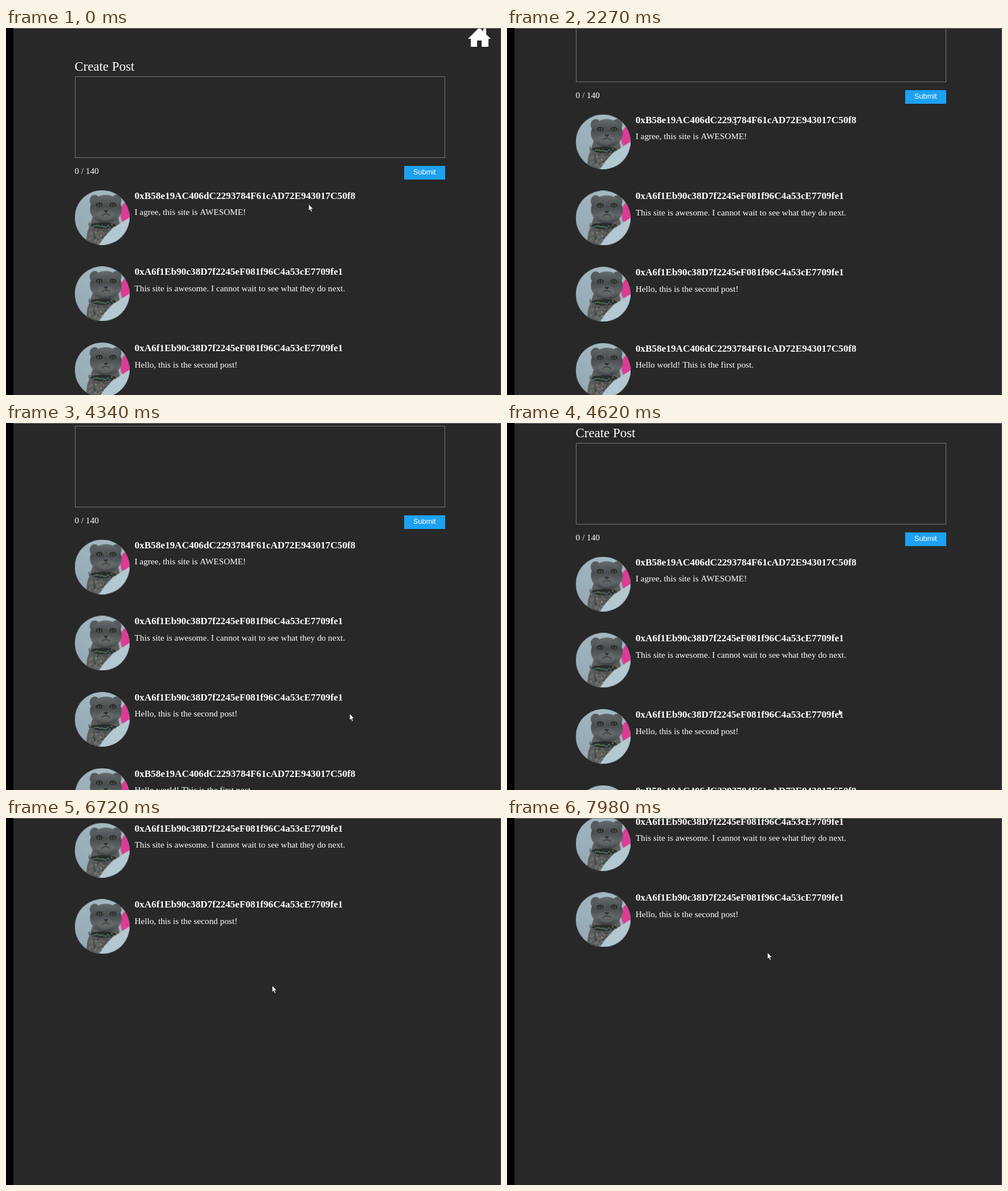
Write an HTML page with a canvas that moves like this. It is 869x644 px and loops after 8000 ms.

```html
<!DOCTYPE html>
<html lang="en">
<head>
<meta charset="utf-8">
<title>Message board</title>
<style>
  html, body { margin: 0; width: 100%; height: 100%; overflow: hidden; background: #282828; }
  canvas { display: block; }
</style>
</head>
<body>
<canvas id="stage" width="869" height="644"></canvas>
<script>
const ctx = document.getElementById('stage').getContext('2d', { alpha: false });
const LOOP = 8000, STEP = 140, PROFILE_AT = 6100;
const POST_GAP = 133.7, FEED_TOP = 284.6, PROFILE_TOP = 54;
const SERIF = '"Liberation Serif", "Times New Roman", serif';
const SANS = '"Liberation Sans", Arial, sans-serif';
const NAME_FONT = `bold 17.19px ${SERIF}`;
const TEXT_FONT = `15.28px ${SERIF}`;

const ANN = '0xB58e19AC406dC2293784F61cAD72E943017C50f8';
const BEN = '0xA6f1Eb90c38D7f2245eF081f96C4a53cE7709fe1';
const feed = [
  [ANN, 'I agree, this site is AWESOME!'],
  [BEN, 'This site is awesome. I cannot wait to see what they do next.'],
  [BEN, 'Hello, this is the second post!'],
  [ANN, 'Hello world! This is the first post.']
];
const profile = feed.filter(post => post[0] === BEN);

// Wheel scrolls: start, duration, distance
const glides = [[1800, 540, 133.7], [4230, 380, -83.7], [6715, 155, -50], [7660, 320, 57.3]];

// Pointer moves: start, duration, destination
const moves = [
  [0, 0, 531, 309],
  [100, 600, 355, 112], [700, 700, 401, 164],
  [2760, 340, 348, 380], [3100, 140, 480, 568], [3240, 120, 624, 518],
  [4060, 560, 582, 502], [4620, 420, 433, 518], [5180, 340, 405, 449],
  [5940, 780, 467, 294], [7140, 160, 459, 256], [7660, 320, 457, 236]
];

const progress = (t, start, span) => Math.max(0, Math.min(1, (t - start) / (span || 1)));
const easeOut = u => 1 - (1 - u) ** 3;
const easeBoth = u => u * u * (3 - 2 * u);

const scrollAt = t => glides.reduce(
  (sum, [start, span, by]) => sum + by * easeOut(progress(t, start, span)), 0);

function pointerAt(t) {
  let [, , x, y] = moves[0];
  for (const [start, span, toX, toY] of moves) {
    const k = easeBoth(progress(t, start, span));
    x += (toX - x) * k;
    y += (toY - y) * k;
  }
  return [Math.round(x), Math.round(y)];
}

function rect(color, x, y, w, h, c = ctx) {
  c.fillStyle = color;
  c.fillRect(x, y, w, h);
}

function text(str, x, y, font) {
  ctx.font = font;
  ctx.fillStyle = '#fff';
  ctx.fillText(str, x, Math.round(y));
}

function poly(c, color, ...points) {
  c.fillStyle = color;
  c.beginPath();
  for (let i = 0; i < points.length; i += 2) c.lineTo(points[i], points[i + 1]);
  c.closePath();
  c.fill();
}

function oval(c, color, x, y, rx, ry = rx) {
  c.fillStyle = color;
  c.beginPath();
  c.ellipse(x, y, rx, ry, 0, 0, Math.PI * 2);
  c.fill();
}

function seeded(seed) {
  return () => (seed = seed * 16807 % 2147483647) / 2147483647;
}

function makeAvatar() {
  const canvas = document.createElement('canvas');
  canvas.width = canvas.height = 96;
  const c = canvas.getContext('2d');
  const random = seeded(7);
  c.arc(48, 48, 48, 0, Math.PI * 2);
  c.clip();

  const wall = c.createLinearGradient(0, 96, 60, 0);
  wall.addColorStop(0, '#93a6b3');
  wall.addColorStop(1, '#a5bac3');
  rect(wall, 0, 0, 96, 96, c);
  oval(c, '#dc3c94', 93, 41, 13, 21);

  poly(c, '#5b5d5b', 31, 48, 22, 74, 19, 96, 64, 96, 80, 64, 76, 46);
  for (let i = 0; i < 130; i++) {
    const y = 58 + random() * 38;
    oval(c, i % 2 ? '#34373880' : '#88898180', 25 + random() * 42, y, 1.3, 2);
  }

  const fur = c.createLinearGradient(0, 8, 0, 59);
  fur.addColorStop(0, '#666b6d');
  fur.addColorStop(0.4, '#484d4f');
  fur.addColorStop(0.7, '#606567');
  fur.addColorStop(1, '#3a3e40');
  for (const ear of [35, 73]) oval(c, '#565b5d', ear, 18, 9, 10);
  oval(c, fur, 54.5, 33, 28, 25);
  oval(c, '#6d717266', 54, 43, 14, 10);

  oval(c, '#292c2d', 50, 62, 22, 5.5);
  for (let i = 0; i < 12; i++) {
    const hue = 20 + random() * 190;
    oval(c, `hsl(${hue} 22% 42%)`, 31 + i * 3.4, 60 + random() * 5, 1.4);
  }
  poly(c, '#b4c8d1', 97, 47, 66, 67, 52, 82, 42, 97, 97, 97);

  for (const eye of [43, 67]) {
    oval(c, '#292d2d', eye, 25.5, 6, 4);
    oval(c, '#77775a', eye, 26, 3, 2);
    oval(c, '#141817', eye, 26, 1.7);
  }
  poly(c, '#2c3032', 50, 35, 59, 35, 54.5, 40);
  c.strokeStyle = '#313537';
  c.lineWidth = 1.3;
  c.beginPath();
  c.moveTo(47, 45);
  c.quadraticCurveTo(54.5, 38, 62, 45);
  c.stroke();
  return canvas;
}
const avatar = makeAvatar();

function home(y) {
  poly(ctx, '#fff', 811, y + 19, 831, y - 1, 851, y + 19);
  rect('#fff', 838, y, 5, 12);
  rect('#fff', 816, y + 18, 31, 15);
  rect('#282828', 827, y + 22, 8, 11);
}

function postForm(y) {
  text('Create Post', 120.5, y + 75, `22.92px ${SERIF}`);
  ctx.strokeStyle = '#767676';
  ctx.lineWidth = 1;
  ctx.strokeRect(121.5, Math.round(y + 85) + 0.5, 649, 142);
  text('0 / 140', 120.5, y + 256, TEXT_FONT);
  rect('#1da1f2', 699, Math.round(y + 241.7), 72, 24);
  text('Submit', 715, y + 257, `12.73px ${SANS}`);
}

function postList(posts, top) {
  posts.forEach(([name, body], i) => {
    const y = top + i * POST_GAP;
    ctx.drawImage(avatar, 120.7, y);
    text(name, 225.7, y + 15, NAME_FONT);
    text(body, 225.7, y + 43.5, TEXT_FONT);
  });
}

function overText(posts, top, x, y) {
  const within = (str, font) => {
    ctx.font = font;
    return x > 226 && x < 226 + ctx.measureText(str).width;
  };
  return posts.some(([name, body], i) => {
    const dy = y - top - i * POST_GAP;
    return (dy > 2 && dy < 21 && within(name, NAME_FONT)) ||
           (dy > 30 && dy < 47 && within(body, TEXT_FONT));
  });
}

function arrow(x, y) {
  ctx.save();
  ctx.translate(x, y);
  poly(ctx, '#fff', 0.3, 0, 0.3, 11.4, 2.8, 9.2, 4.7, 13.5, 6.5, 12.7, 4.7, 8.5, 8, 8.3);
  ctx.strokeStyle = '#111';
  ctx.lineWidth = 0.6;
  ctx.stroke();
  ctx.restore();
}

function beam(x, y) {
  const color = '#d6d6d6';
  rect(color, x, y - 6, 1, 12);
  for (const edge of [-7, 5]) {
    rect(color, x - 2, y + edge, 2, 1);
    rect(color, x + 1, y + edge, 2, 1);
  }
}

function draw(t) {
  const now = Math.floor((t + 10) / STEP) * STEP;
  const scroll = scrollAt(now);
  const [x, y] = pointerAt(now);
  const onFeed = now < PROFILE_AT;
  const posts = onFeed ? feed : profile;
  const top = (onFeed ? FEED_TOP : PROFILE_TOP) - scroll;

  rect('#282828', 0, 0, 869, 644);
  home(-scroll);
  if (onFeed) postForm(-scroll);
  postList(posts, top);

  rect('#000', 0, 0, 13, 644);
  rect('#777', 13, 0, 856, 1);
  rect('#4a4a4a', 868, 0, 1, 644);

  const inForm = onFeed && x > 121 && x < 771 && y + scroll > 85 && y + scroll < 228;
  const cursor = inForm || overText(posts, top, x, y) ? beam : arrow;
  cursor(x, y);
}

function tick() {
  draw(performance.now() % LOOP);
  requestAnimationFrame(tick);
}
tick();
</script>
</body>
</html>
```
